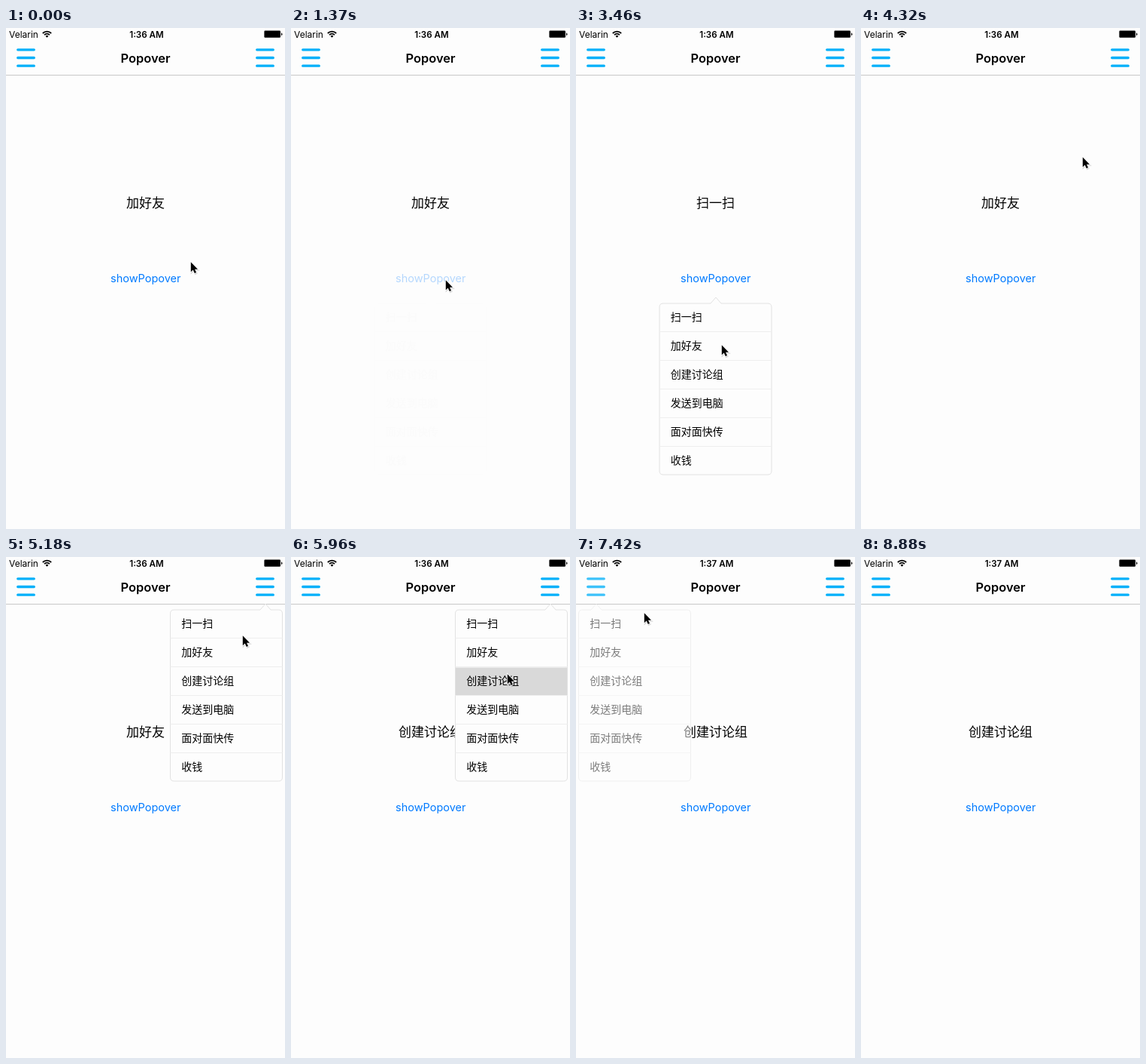
Animation, 371 px wide and 664 px high, one loop 9.27 s. Source, as an HTML page:

```html
<!DOCTYPE html>
<html lang="zh-CN">
<head>
<meta charset="utf-8">
<title>Popover</title>
<style>
  html, body { margin: 0; width: 100%; height: 100%; overflow: hidden; background: #fdfdfd; }
  svg { display: block; width: 371px; height: 664px; }
  text { font-family: Inter, "Noto Sans CJK SC", "Noto Sans CJK", sans-serif; }
  .cjk { font-family: "Noto Sans CJK SC", "Noto Sans CJK", sans-serif; }
  .mid { text-anchor: middle; }
</style>
</head>
<body>
<svg viewBox="0 0 371 664">
  <defs>
    <path id="bars" d="M1.7 0h21.6m-21.6 10.7h21.6m-21.6 10.7h21.6" stroke="#02b0fa" stroke-width="3.3" stroke-linecap="round"/>
    <path id="arrow" d="M0 0V15.2L3.4 12L5.8 17.2L8.4 16L6.1 11H10.7Z"/>
  </defs>
  <rect width="371" height="664" fill="#fdfdfd"/>
  <path d="M0 62.5H371" stroke="#c8c8c8"/>
  <text x="4" y="12.6" font-size="12">Velarin</text>
  <path d="M48.8 7A8.2 8.2 0 0 1 60.2 7M51 9.2A5 5 0 0 1 58 9.2" fill="none" stroke="#000" stroke-width="1.8"/>
  <path d="M54.5 12.8L52.6 10.8A2.7 2.7 0 0 1 56.4 10.8Z"/>
  <text id="clock" class="mid" x="187" y="12.5" font-size="11.6" font-weight="600"></text>
  <rect x="343.4" y="3.6" width="21.6" height="9.2" rx="1.2"/>
  <path d="M366 6.3a2 2 0 0 1 0 3.8z"/>
  <text class="mid" x="185.5" y="46" font-size="16.4" font-weight="600">Popover</text>
  <use id="left" href="#bars" x="14" y="28.8"/>
  <use id="right" href="#bars" x="332" y="28.8"/>
  <text id="label" class="mid cjk" x="185.5" y="238.3" font-size="17"></text>
  <text id="button" class="mid" x="185.8" y="337" font-size="14.5" fill="#007aff">showPopover</text>
  <g id="popover"></g>
  <g id="cursor">
    <use href="#arrow" x=".8" y="1.4" stroke="#000" stroke-width="2" opacity=".15"/>
    <use href="#arrow" stroke="#fff" stroke-width="1.8" paint-order="stroke"/>
  </g>
</svg>
<script>
const LOOP = 9270, ROW = 38, WIDTH = 149;
const items = ['扫一扫', '加好友', '创建讨论组', '发送到电脑', '面对面快传', '收钱'];
const HEIGHT = ROW * items.length - 1;
const $ = id => document.getElementById(id);
const ramp = (t, from, span) => Math.max(0, Math.min(1, (t - from) / span));
const ease = u => u * u * (3 - 2 * u);
const mix = (a, b, u) => a + (b - a) * u;

// Delays that every tap shares
const HOLD = 180, FADE_IN = 260, FADE_OUT = 150, LINGER = 150;

// Where each button is tapped and where its popover opens
const panels = {
  button: { tap: [205, 333], x: 111, y: 365, tip: 75 },
  right: { tap: [342, 51], x: 218.5, y: 70, tip: 126.5 },
  left: { tap: [28, 43], x: 3.5, y: 70, tip: 23.5 }
};

// The pointer reaches a button, presses it, settles on a spot and taps there
const visits = [
  { id: 'button', reach: 760, press: 1170, settle: 1730, pick: [211, 370], hide: 2080, row: 0 },
  { id: 'button', reach: 2850, press: 3020, settle: 3460, pick: [193, 419], hide: 3700, row: 1 },
  { id: 'right', reach: 4610, press: 4640, settle: 5540, pick: [287, 154], hide: 5930, row: 2 },
  { id: 'left', reach: 6910, press: 7100, settle: 7660, pick: [227, 141], hide: 8010 }
];

// Pointer moves in order, each from the end of the one before
const moves = [];
let leave = 540;
for (const v of visits) {
  moves.push({ from: leave, to: v.reach, end: panels[v.id].tap });
  moves.push({ from: v.press + HOLD, to: v.settle, end: v.pick });
  leave = v.hide + LINGER;
}
moves.push({ from: leave, to: 8880, end: [329, 668] });

function pointer(t) {
  let pos = [245, 309];
  for (const m of moves) {
    const u = ease(ramp(t, m.from, m.to - m.from));
    pos = pos.map((p, i) => mix(p, m.end[i], u));
  }
  return pos;
}

function popoverMarkup({ x, y, tip }, picked) {
  const outline = `M5 0H${tip - 7}l7 -8l7 8H${WIDTH - 5}q5 0 5 5V${HEIGHT - 5}q0 5 -5 5H5q-5 0 -5 -5V5q0 -5 5 -5z`;
  const rows = items.map((s, i) =>
    (i === picked ? `<rect x=".5" y="${i * ROW + .5}" width="${WIDTH - 1}" height="${ROW - 1}" fill="#d9d9d9"/>` : '') +
    (i ? `<path d="M0 ${i * ROW - .5}H${WIDTH}" stroke="#eee"/>` : '') +
    `<text class="cjk" x="14.7" y="${i * ROW + 23}" font-size="14">${s}</text>`);
  return `<g transform="translate(${x} ${y})"><path d="${outline}" fill="#fdfdfd" stroke="#e2e2e2"/>${rows.join('')}</g>`;
}

let drawn = '';
function draw(t) {
  let label = items[1], markup = '', alpha = 0;
  const dim = { button: 1, left: 1, right: 1 };
  for (const { id, press, hide, row } of visits) {
    const release = press + HOLD, tapped = t >= hide;
    if (t >= press) dim[id] = mix(.2, 1, ramp(t, release, 200));
    if (tapped && row !== undefined) label = items[row];
    const a = ease(ramp(t, release + 10, FADE_IN)) * (1 - ease(ramp(t, hide + 40, FADE_OUT)));
    if (a > 0) {
      alpha = a;
      markup = popoverMarkup(panels[id], tapped ? row : -1);
    }
  }
  for (const id in dim) $(id).setAttribute('opacity', dim[id]);
  $('label').textContent = label;
  $('clock').textContent = t < 6810 ? '1:36 AM' : '1:37 AM';
  if (markup !== drawn) $('popover').innerHTML = drawn = markup;
  $('popover').setAttribute('opacity', alpha);
  const [x, y] = pointer(t).map(Math.round);
  $('cursor').setAttribute('transform', `translate(${x + .8} ${y + 1.2}) scale(.86)`);
}

const start = performance.now();
function tick() {
  draw((performance.now() - start) % LOOP);
  requestAnimationFrame(tick);
}
tick();
</script>
</body>
</html>
```
